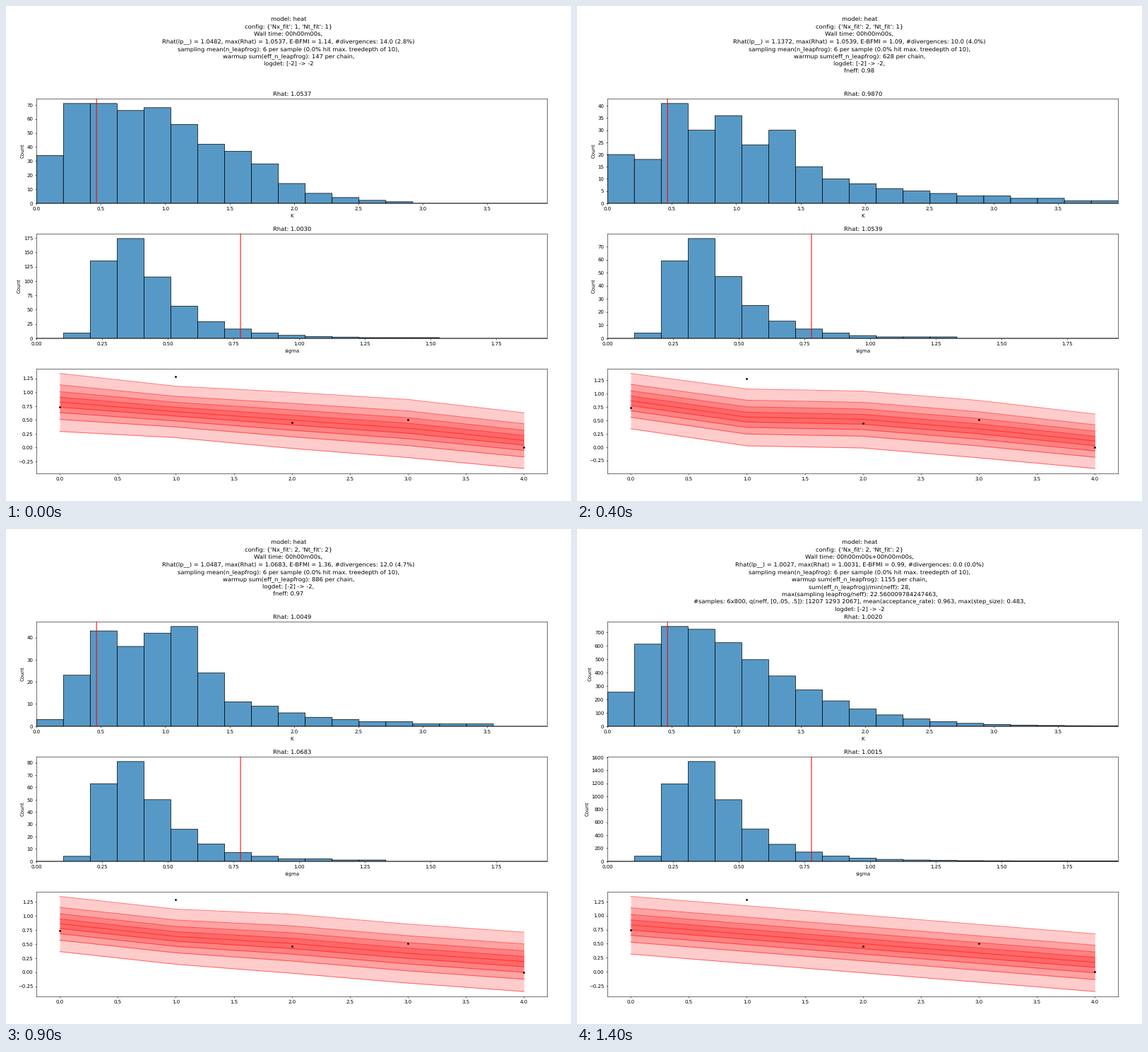
A matplotlib script that plays this animation: 800 px wide and 700 px high, repeating every 1.6 s.

```python
import matplotlib.pyplot as plt
import numpy as np
from matplotlib.animation import FuncAnimation

W, H, DPI = 800, 700, 50
STEP = 100                    # ms per tick
SWITCH = [0, 1, 6, 11]        # tick at which each state begins
TICKS = 16
BINS = 19
K_MAX, SIGMA_MAX = 3.966, 1.945
K_TRUE, SIGMA_TRUE = 0.466, 0.777
OBSERVED = [0.74, 1.285, 0.455, 0.51, 0.0]
BAR = (*plt.cm.tab10(0)[:3], 0.75)

plt.rcParams.update({"font.family": "DejaVu Sans", "text.hinting": "none"})


def summary(nx, nt, wall, rhat, rhat_max, bfmi, div, warmup, *rest):
    return [
        "model: heat",
        f"config: {{'Nx_fit': {nx}, 'Nt_fit': {nt}}}",
        f"Wall time: {wall},",
        f"Rhat(lp__) = {rhat}, max(Rhat) = {rhat_max}, "
        f"E-BFMI = {bfmi}, #divergences: {div}",
        "sampling mean(n_leapfrog): 6 per sample (0.0% hit max. treedepth of 10),",
        f"warmup sum(eff_n_leapfrog): {warmup} per chain,",
        *rest,
    ]


def binned(density, peak):
    """Bin counts of a density over bin units, scaled to a tallest bar."""
    x = np.arange(0.05, BINS, 0.1)
    means = density(x).reshape(BINS, 10).mean(axis=1)
    return np.round(peak * means / means.max())


def sigma_density(x):
    return x ** -5.32 * np.exp(-25.5 / x ** 2)


def k_density(x):
    return x ** 1.05 * np.exp(-0.235 * x ** 1.25)


def with_tail(body, decay):
    """A noisy body of counts followed by a geometric tail."""
    tail = body[-1] * decay ** np.arange(1, BINS - len(body) + 1)
    return np.append(body, np.round(tail))


def quantiles(top, bottom):
    """Nine near-normal quantile lines from the 95% line down to the 5% one."""
    p = np.linspace(0.95, 0.05, 9)
    z = p ** 0.135 - (1 - p) ** 0.135
    level = 0.505 + 0.5 * z / z[0]
    level[[0, -1]] = 1, 0
    top, bottom = np.array(top), np.array(bottom)
    return bottom[:, None] + np.outer(top - bottom, level)


class Fit:
    """One sampler result: header, two posteriors and predictive lines."""

    def __init__(self, header, rhats, k, sigma_peak, top, bottom):
        self.header, self.rhats, self.k = header, rhats, k
        self.sigma = binned(sigma_density, sigma_peak)
        self.lines = quantiles(top, bottom)


trend = np.linspace(0.833, 0.165, 5)

FITS = [
    Fit(summary(1, 1, "00h00m00s", "1.0482", "1.0537", "1.14", "14.0 (2.8%)",
                147, "logdet: [-2] -> -2"),
        ("1.0537", "1.0030"),
        with_tail([34, 71, 71, 66, 68, 56, 42, 37, 28], 0.5), 174,
        [1.341, 1.11, 1.0, 0.87, 0.63], [0.292, 0.18, -0.015, -0.18, -0.378]),
    Fit(summary(2, 1, "00h00m00s", "1.1372", "1.0539", "1.09", "10.0 (4.0%)",
                628, "logdet: [-2] -> -2,", "fneff: 0.98"),
        ("0.9870", "1.0539"),
        with_tail([20, 18, 41, 30, 36, 24, 30, 15, 10], 0.8), 76,
        [1.382, 1.09, 1.05, 0.875, 0.62], [0.345, 0.025, -0.015, -0.2, -0.4]),
    Fit(summary(2, 2, "00h00m00s", "1.0487", "1.0683", "1.36", "12.0 (4.7%)",
                886, "logdet: [-2] -> -2,", "fneff: 0.97"),
        ("1.0049", "1.0683"),
        with_tail([3, 23, 43, 36, 42, 45, 24, 11, 9], 0.7), 81,
        [1.347, 1.12, 1.03, 0.855, 0.71], [0.365, 0.14, -0.02, -0.195, -0.345]),
    Fit(summary(2, 2, "00h00m00s+00h00m00s", "1.0027", "1.0031", "0.99",
                "0.0 (0.0%)", 1155,
                "sum(eff_n_leapfrog)/min(neff): 28,",
                "max(sampling leapfrog/neff): 22.560009784247463,",
                "#samples: 6x800, q(neff, [0,.05, .5]): [1207 1293 2067], "
                "mean(acceptance_rate): 0.963, max(step_size): 0.483,",
                "logdet: [-2] -> -2"),
        ("1.0020", "1.0015"),
        binned(k_density, 745), 1534,
        trend + 0.51, trend - 0.52),
]

fig = plt.figure(figsize=(W / DPI, H / DPI), dpi=DPI)
ax_k, ax_sigma, ax_pred = [
    fig.add_axes([43.2 / W, 1 - (278.8 + 191 * i) / H, 723 / W, 148 / H])
    for i in range(3)]
header = [fig.text(0.5, 1 - (21 + 10.45 * i) / H, "", size=12,
                   ha="center", va="baseline") for i in range(10)]


def histogram(ax, counts, x_max, truth, name, rhat):
    ax.clear()
    width = x_max / BINS
    ax.bar(np.arange(BINS) * width, counts, width, align="edge",
           facecolor=BAR, edgecolor="black", lw=1, snap=False)
    ax.axvline(truth, color="red", snap=False)
    ax.set(xlim=(0, x_max), ylim=(0, 1.05 * max(counts)),
           xlabel=name, ylabel="Count", title=f"Rhat: {rhat}")


def predictive(ax, q):
    ax.clear()
    x = np.arange(len(q))
    for i in range(4):
        ax.fill_between(x, q[:, i], q[:, -1 - i], color="red", alpha=0.2, lw=0)
    ax.plot(x, q, color="red", alpha=0.5)
    ax.scatter(x, OBSERVED, s=9, color="black", lw=1, zorder=3)


def draw(tick):
    fit = FITS[np.searchsorted(SWITCH, tick, side="right") - 1]
    for i, line in enumerate(header):
        line.set_text(fit.header[i] if i < len(fit.header) else "")
    histogram(ax_k, fit.k, K_MAX, K_TRUE, "K", fit.rhats[0])
    histogram(ax_sigma, fit.sigma, SIGMA_MAX, SIGMA_TRUE, "sigma", fit.rhats[1])
    predictive(ax_pred, fit.lines)
    return []


anim = FuncAnimation(fig, draw, frames=TICKS, interval=STEP, repeat=True,
                     repeat_delay=0, init_func=lambda: draw(0))
plt.show()
```
